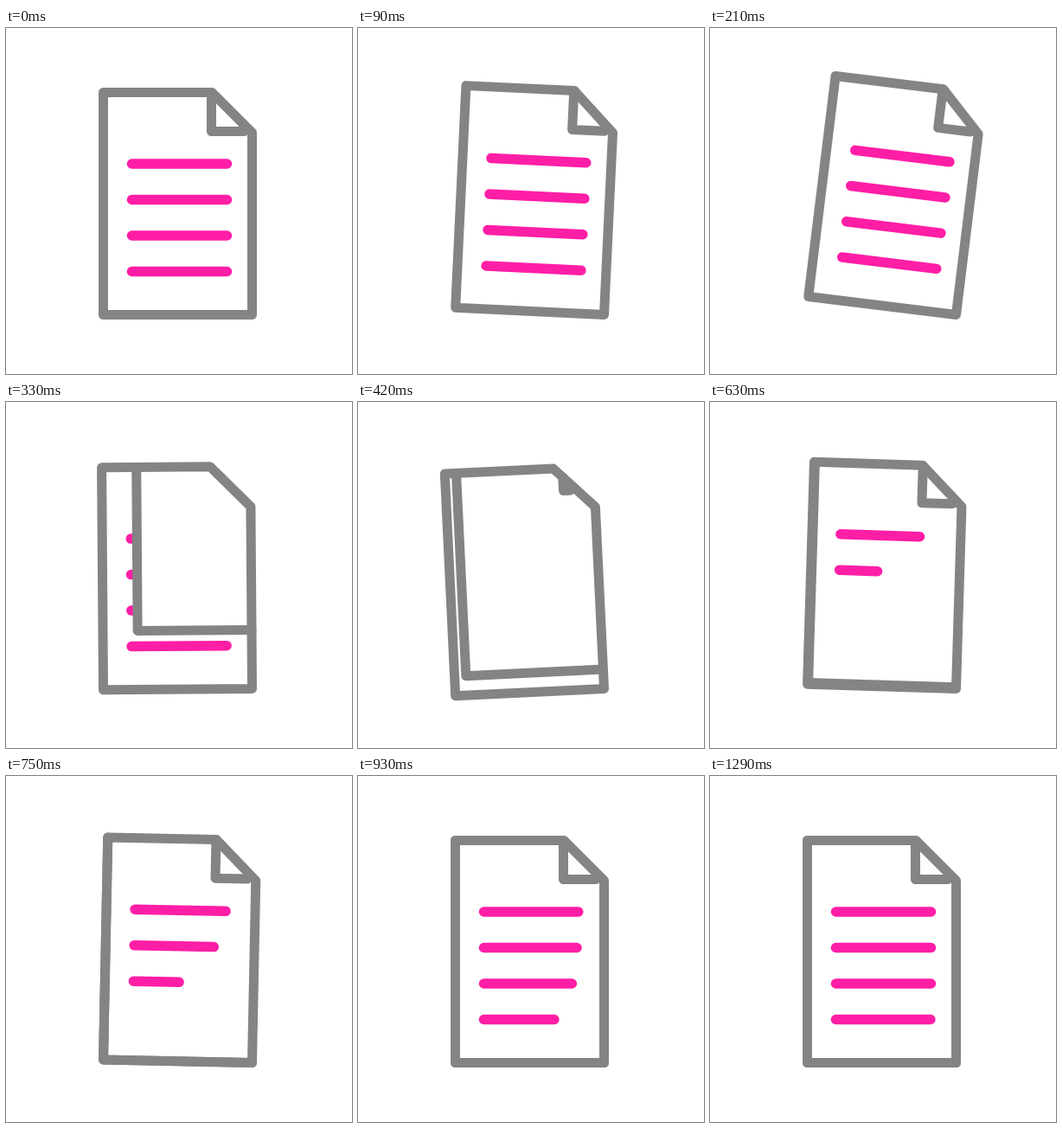
An HTML page with a canvas for the animation above (1830 ms loop, 400x400 px).

```html
<!DOCTYPE html>
<html lang="en">
<head>
<meta charset="utf-8">
<title>Turning page</title>
<style>
  html, body { margin: 0; width: 100%; height: 100%; overflow: hidden; background: #fff; }
  canvas { display: block; width: 100vw; height: 100vh; object-fit: contain; }
</style>
</head>
<body>
<canvas id="stage" width="400" height="400"></canvas>
<script>
const ctx = document.getElementById('stage').getContext('2d');
const LOOP = 1830, STEP = 30;
const GREY = '#848484', PINK = '#ff1ea6';

const page = { left: 112.5, top: 74.5, right: 284.5, bottom: 331.5, cutX: 238, cutY: 121 };
const foldRest = { x: 237.5, y: 119.5 };
const foldHidden = { x: 264, y: 74.5 };
const foldOpen = { x: page.left, y: page.bottom };

const rows = [157, 198.5, 240, 281.5];
const rowStarts = [465, 583, 690, 806];
const rowLeft = 145.5, rowLength = 110;

// [time, degrees] of each swing extreme
const swing = [[0, 0], [210, 7], [390, -2.9], [660, 1.9], [870, 0]];

const lerp = (a, b, p) => a + (b - a) * p;
const mix = (a, b, p) => ({ x: lerp(a.x, b.x, p), y: lerp(a.y, b.y, p) });

function settle(time, start, tau) {
  if (time <= start) return 0;
  const rest = Math.exp(-(time - start) / tau);
  return rest < 0.005 ? 1 : 1 - rest;
}

function swingAngle(time) {
  for (let i = 1; i < swing.length; i++) {
    const [t0, a0] = swing[i - 1], [t1, a1] = swing[i];
    if (time < t1) return lerp(a0, a1, (1 - Math.cos(Math.PI * (time - t0) / (t1 - t0))) / 2);
  }
  return 0;
}

function trace(points, closed) {
  ctx.beginPath();
  points.forEach(([x, y]) => ctx.lineTo(x, y));
  if (closed) ctx.closePath();
}

function strokePath(points, color, width, closed) {
  trace(points, closed);
  ctx.strokeStyle = color;
  ctx.lineWidth = width;
  ctx.stroke();
}

function drawRow(y, amount) {
  if (amount > 0) strokePath([[rowLeft, y], [rowLeft + rowLength * amount, y]], PINK, 11.5);
}

function drawFold({ x, y }) {
  const { top, right, cutX, cutY } = page;
  const startY = Math.max(top, top + x - cutX);
  const endX = Math.min(right, cutX + y - top - 8);
  if (startY >= y || endX <= x) return;
  trace([[x, startY], [Math.max(x, cutX), startY], [right, cutY], [right, y], [x, y]], true);
  ctx.fillStyle = '#fff';
  ctx.fill();
  strokePath([[x, startY], [x, y], [endX, y]], GREY, 11);
}

function draw(time) {
  ctx.setTransform(1, 0, 0, 1, 0, 0);
  ctx.fillStyle = '#fff';
  ctx.fillRect(0, 0, 400, 400);
  ctx.lineCap = ctx.lineJoin = 'round';

  ctx.translate(page.right, page.bottom);
  ctx.rotate(swingAngle(time) * Math.PI / 180);
  ctx.translate(-page.right, -page.bottom);

  const turned = settle(time, 238, 81);
  if (turned < 1) rows.forEach(y => drawRow(y, 1));
  drawFold(mix(foldRest, foldOpen, turned));

  rows.forEach((y, i) => drawRow(y, settle(time, rowStarts[i], 92)));
  const refolded = settle(time, 348, 83);
  if (refolded > 0) drawFold(mix(foldHidden, foldRest, refolded));

  const { left, top, right, bottom, cutX, cutY } = page;
  strokePath([[left, top], [cutX, top], [right, cutY], [right, bottom], [left, bottom]], GREY, 11, true);
}

const origin = performance.now();
function tick() {
  const elapsed = (performance.now() - origin) % LOOP;
  draw(Math.floor(elapsed / STEP) * STEP);
  requestAnimationFrame(tick);
}
tick();
</script>
</body>
</html>
```
